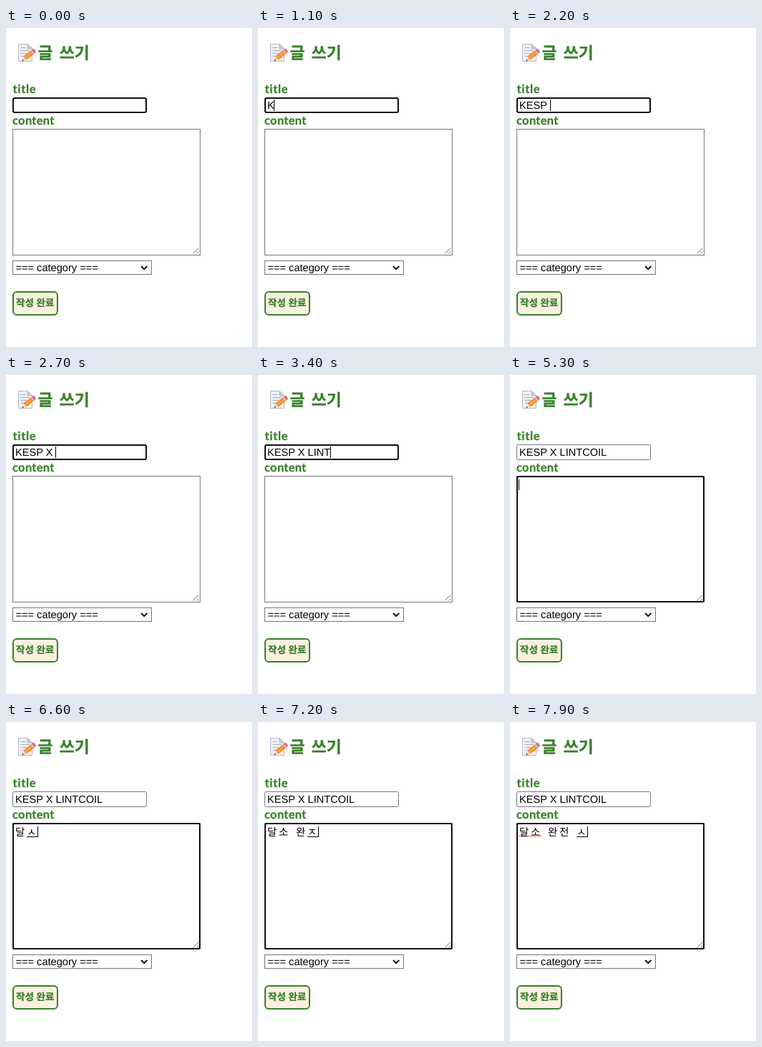
An HTML page that plays this animation: 344x446 px, repeating every 8 s.

```html
<!DOCTYPE html>
<html lang="ko">
<head>
<meta charset="utf-8">
<title>글 쓰기</title>
<style>
  html, body { margin: 0; width: 100%; height: 100%; overflow: hidden; background: #fff; }
  svg { display: block; width: 344px; height: 446px; }
  text { white-space: pre; text-rendering: geometricPrecision; }
  .ko { font-family: "Noto Sans CJK KR", "Noto Sans CJK", sans-serif; font-weight: 700; }
  .label { font: 700 16.5px Lato, sans-serif; }
  .green { fill: #38802a; stroke: #38802a; stroke-width: .3; stroke-linejoin: round; }
  .field { font: 14.6px "Liberation Sans", Arial, sans-serif; fill: #000; }
  .body { font: 300 14.5px "Noto Sans CJK KR", "Noto Sans CJK", sans-serif; fill: #000; }
  .box { fill: #fff; stroke: #767676; stroke-width: 1; }
  .ring { fill: none; stroke: #101010; stroke-width: 2; }
  .line { fill: none; stroke: #000; stroke-width: 1; }
</style>
</head>
<body>
<svg viewBox="0 0 344 446">
  <!-- memo icon -->
  <g stroke-linejoin="round">
    <path d="M17.5 22.5H30L36.5 29V46.5H17.5Z" fill="#edf0f5" stroke="#b3b8c2"/>
    <path d="M30 22.5V29H36.5Z" fill="#c9ced8" stroke="#b3b8c2"/>
    <path d="M20.5 27.5H27M20.5 31.5H33M20.5 35.5H29M20.5 39.5H25" fill="none" stroke="#a9b0bd"/>
    <path d="M22.5 46.2L24.5 39.5L28.6 44.6Z" fill="#f6cf9e"/>
    <path d="M22.5 46.2L23.2 43.7L24.8 45.6Z" fill="#4a3b3b"/>
    <path d="M24.5 39.5L34.6 31.4L38.8 36.5L28.6 44.6Z" fill="#f58a2c"/>
    <path d="M25.9 41.2L36 33.1L37.4 34.8L27.2 42.9Z" fill="#fca54a"/>
    <path d="M34.6 31.4L36 30.3L40.2 35.4L38.8 36.5Z" fill="#b9c0c9"/>
    <path d="M36 30.3L37.3 29.3Q38.8 28.4 40 29.9L41 31.3Q42.2 33.2 41.2 34.5L40.2 35.4Z" fill="#e8607c"/>
  </g>
  <text class="ko green" x="44.5" y="43.3" font-size="22.8" word-spacing="3">글 쓰기</text>

  <text class="label green" x="9.5" y="91" letter-spacing=".7">title</text>
  <rect class="box" x="9.5" y="97.5" width="187" height="21" rx="2"/>
  <rect class="ring" id="titleRing" x="10" y="98" width="186" height="20" rx="2.5"/>
  <text class="field" id="title" x="13" y="113"></text>
  <path class="line" id="titleCaret"/>

  <text class="label green" x="9" y="135" letter-spacing=".3">content</text>
  <rect class="box" x="9.5" y="141.5" width="262" height="176"/>
  <rect class="ring" id="bodyRing" x="10" y="142" width="261" height="175" rx="2"/>
  <path d="M261.5 315.5L269.5 307.5M266.5 315.5L269.5 312.5" fill="none" stroke="#777"/>
  <path id="wave" fill="none" stroke="#e8403a"/>
  <text class="body" id="content" y="158.6"></text>
  <path class="line" id="under"/>
  <path class="line" id="bodyCaret"/>

  <rect class="box" x="9.5" y="325.5" width="194" height="19"/>
  <text class="field" x="13.5" y="340">=== category ===</text>
  <path d="M189 333L193.2 337.2L197.4 333" fill="none" stroke="#111" stroke-width="2"/>

  <rect x="10" y="369" width="62" height="32" rx="5" fill="#faf0e1" stroke="#38802a" stroke-width="2"/>
  <text class="ko green" x="14" y="388.8" font-size="13.5">작성 완료</text>
</svg>
<script>
const LOOP = 8000, SIZE = 14.6, LEFT = 13, CELL = 16;
const el = id => document.getElementById(id);
const show = (id, on) => { el(id).style.display = on ? "" : "none"; };
const within = (t, a, b) => t >= a && t < b;

// time of each key press in the title
const title = "KESP X LINTCOIL";
const keys = [1000, 1200, 1300, 1500, 1900, 2400, 2700, 2900, 3100, 3300, 3400, 3600, 3700, 3900, 4100];

// composition states: time, text, whether the last syllable is still open
const steps = [
  [0, "", 0], [6000, "ㄷ", 1], [6100, "다", 1], [6400, "달", 1],
  [6600, "달ㅅ", 1], [6700, "달소", 1], [6800, "달소 ", 0],
  [6900, "달소 ㅇ", 1], [7000, "달소 와", 1], [7100, "달소 완", 1],
  [7200, "달소 완ㅈ", 1], [7300, "달소 완저", 1], [7500, "달소 완전", 1],
  [7700, "달소 완전 ", 0], [7900, "달소 완전 ㅅ", 1]
];

const pen = document.createElement("canvas").getContext("2d");
pen.font = '100px "Liberation Sans", Arial, sans-serif';
const widthOf = s => pen.measureText(s).width * SIZE / 100;

let zig = "M12 160.5";
for (let x = 14; x <= 44; x += 2) zig += `L${x} ${x % 4 ? 158.5 : 160.5}`;
el("wave").setAttribute("d", zig);

function drawTitle(t) {
  const text = title.slice(0, keys.filter(k => k <= t).length);
  el("title").textContent = text;
  const x = Math.floor(LEFT + widthOf(text)) + .5;
  el("titleCaret").setAttribute("d", `M${x} 100V116`);
  show("titleCaret", within(t, 100, 700) || within(t, 1000, 4700));
  show("titleRing", t < 5200);
}

function drawBody(t) {
  const [, text, open] = steps.filter(s => s[0] <= t).pop();
  const xs = [];
  let x = 12;
  for (const c of text) {
    xs.push(x + 1);
    x += c === " " ? CELL / 2 : CELL;
  }
  el("content").textContent = text;
  el("content").setAttribute("x", xs.join(" "));
  el("under").setAttribute("d", `M${x - CELL + 1} 160.5H${x}`);
  el("bodyCaret").setAttribute("d", `M${x + .5} 146V161`);
  show("under", open);
  show("wave", t >= 7500);
  show("bodyRing", t >= 4900);
  show("bodyCaret", within(t, 4900, 5500) || t >= 6000);
}

function frame(now) {
  const t = now % LOOP;
  drawTitle(t);
  drawBody(t);
  requestAnimationFrame(frame);
}
frame(0);
</script>
</body>
</html>
```
